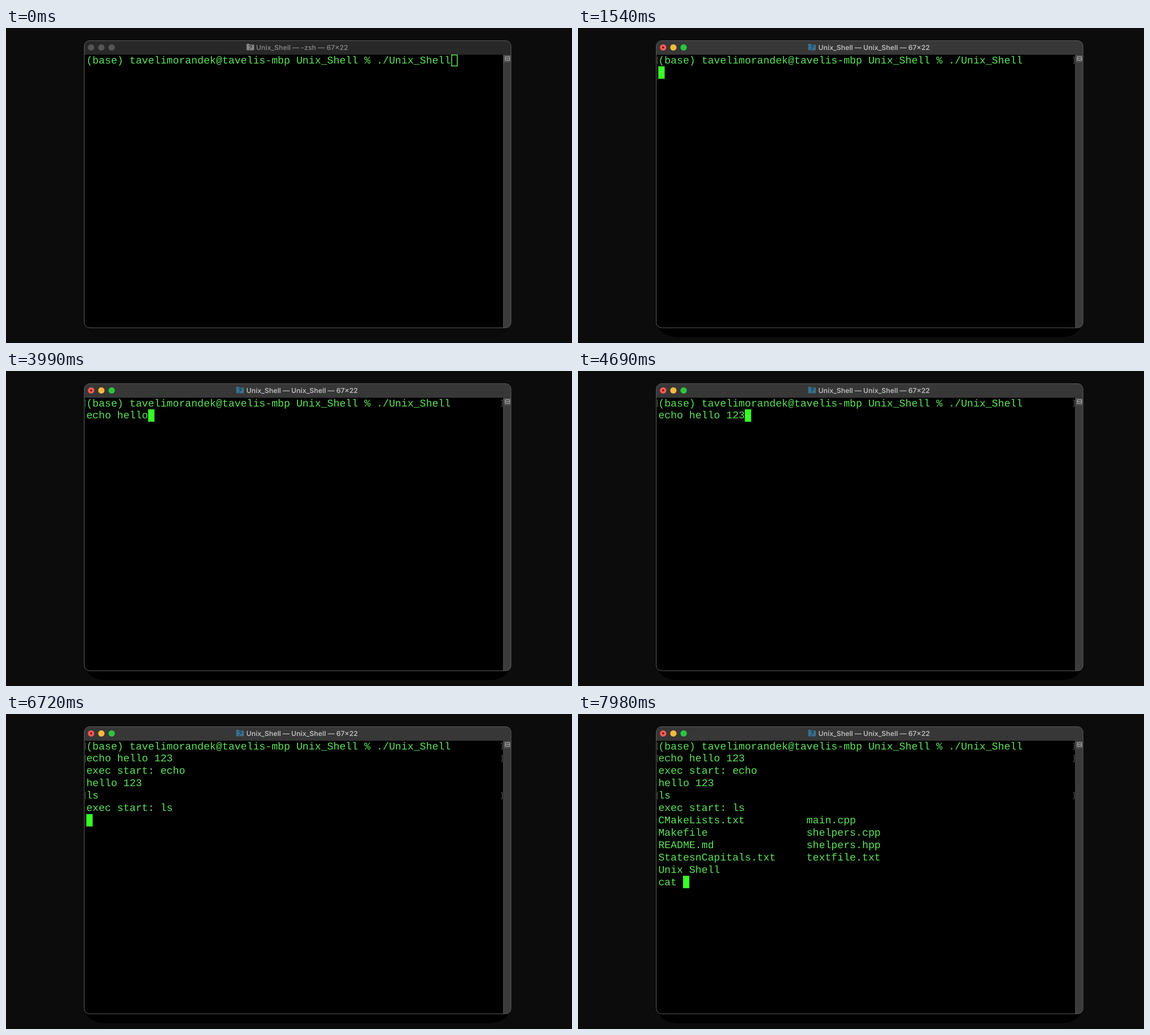
An HTML page for the animation above (8000 ms loop, 1002 by 559 pixels).

```html
<!DOCTYPE html>
<html lang="en">
<head>
<meta charset="utf-8">
<title>Terminal session</title>
<style>
  html, body { margin: 0; width: 100%; height: 100%; overflow: hidden; background: #0c0c0c; }
  svg { display: block; width: 100%; height: 100%; }
  text { white-space: pre; text-rendering: geometricPrecision; }
  .term { font: 18.23px "Liberation Mono", monospace; fill: #5ce35a; }
  .title { font: 600 12.2px Inter, sans-serif; text-anchor: middle; }
</style>
</head>
<body>
<svg viewBox="0 0 1002 559">
  <rect width="1002" height="559" fill="#0c0c0c"/>
  <path id="shadow" d="M143 525H889V533Q880 549 850 549H182Q152 549 143 533Z"/>
  <clipPath id="frame"><rect x="138.5" y="22.5" width="755.5" height="509.5" rx="9.5"/></clipPath>
  <g clip-path="url(#frame)">
    <rect x="138" y="22" width="757" height="511"/>
    <rect id="bar" x="138" y="22" width="757" height="25.5"/>
    <rect x="880.5" y="47.5" width="14" height="485" fill="#3b3b3b"/>
    <path d="M880.5 47.5V532" stroke="#4a4a4a" fill="none"/>
    <rect x="881" y="48" width="13" height="13" fill="#505050"/>
    <path d="M884 51h7.500v6.500h-7.500zM884 54.250h7.500" fill="none" stroke="#b0b0b0"/>
  </g>
  <rect x="138.500" y="22.500" width="755.500" height="509.500" rx="9.500" fill="none" stroke="#5b5b5b"/>
  <g id="lights">
    <circle cx="150.700" cy="34.500" r="5.600"/>
    <circle cx="168.800" cy="34.500" r="5.600"/>
    <circle cx="187" cy="34.500" r="5.600"/>
  </g>
  <circle id="dot" cx="150.700" cy="34.500" r="1.800" fill="#7a0b08"/>
  <g id="icon">
    <path id="folder" d="M0 1.500Q0 .5 1 .5H4.500L6 2H12.500Q13.500 2 13.500 3V11Q13.500 12 12.500 12H1Q0 12 0 11Z"/>
    <path id="glyph" d="M4.500 5Q5 3.500 7 3.500T9 5.500Q9 6.500 7 7.500V8.500M5 10.500L6 9.500" fill="none" stroke-width="1.200"/>
  </g>
  <text id="title" class="title" x="524.200" y="38.600"></text>
  <path id="marks" fill="none" stroke="#626262"/>
  <rect id="cursor"/>
  <g id="lines" class="term"></g>
</svg>
<script>
const LOOP = 8000, FOCUS = 700, LAUNCH = 1400;
const LEFT = 142.2, TOP = 46.1, COL = 10.94, ROW = 21.91;
const PROMPT = '(base) tavelimorandek@tavelis-mbp Unix_Shell % ./Unix_Shell';

const LISTING = [
  ['CMakeLists.txt', 'main.cpp'],
  ['Makefile', 'shelpers.cpp'],
  ['README.md', 'shelpers.hpp'],
  ['StatesnCapitals.txt', 'textfile.txt'],
  ['Unix Shell', '']
].map(([a, b]) => (b ? a.padEnd(24) + b : a) + '\n').join('');

// [time, appended output]
const OUTPUT = [
  [1260, '\n'],
  [2450, 'e'], [2730, 'c'], [2870, 'h'], [3080, 'o'], [3290, ' '],
  [3430, 'h'], [3570, 'e'], [3710, 'l'], [3850, 'l'], [3990, 'o'],
  [4130, ' '], [4340, '1'], [4550, '2'], [4690, '3'],
  [4830, '\nexec start: echo\n'],
  [4900, 'hello 123\n'],
  [6020, 'l'], [6230, 's'],
  [6720, '\nexec start: ls\n'],
  [6790, LISTING],
  [7560, 'c'], [7700, 'a'], [7840, 't'], [7980, ' ']
];

// [time, row] of each entered command
const ENTERED = [[1260, 0], [4830, 1], [6720, 4]];

const $ = id => document.getElementById(id);
const set = (el, attrs) => {
  for (const k in attrs) el.setAttribute(k, attrs[k]);
};

const rows = Array.from({ length: 22 }, (_, i) => {
  const el = document.createElementNS('http://www.w3.org/2000/svg', 'text');
  set(el, { x: LEFT, y: TOP + i * ROW + 16.4 });
  return $('lines').appendChild(el);
});

function drawChrome(t) {
  const active = t >= FOCUS, running = t >= LAUNCH;
  const colors = active ? ['#fc5b54', '#f6b83c', '#2ac640'] : ['#555', '#555', '#555'];
  [...$('lights').children].forEach((c, i) => set(c, { fill: colors[i] }));
  set($('dot'), { visibility: active ? 'visible' : 'hidden' });
  set($('shadow'), { fill: active ? '#000' : '#0a0a0a' });
  set($('bar'), { fill: active ? '#373737' : '#282828' });
  set($('folder'), { fill: active ? '#39718d' : '#858585' });
  set($('glyph'), { stroke: active ? '#172c39' : '#222' });
  set($('icon'), { transform: `translate(${running ? 407.5 : 425.8} 27.5)` });
  set($('title'), { fill: active ? '#b9b9b9' : '#7d7d7d' });
  $('title').textContent = `Unix_Shell — ${running ? 'Unix_Shell' : '-zsh'} — 67×22`;
}

function drawText(t) {
  const text = OUTPUT.reduce((s, [at, out]) => t >= at ? s + out : s, PROMPT);
  const lines = text.split('\n');
  rows.forEach((el, i) => {
    const line = lines[i] || '';
    if (el.textContent !== line) el.textContent = line;
  });

  const last = lines.length - 1;
  const x = LEFT + lines[last].length * COL, y = TOP + last * ROW;
  set($('cursor'), t < FOCUS
    ? { x: x + 1.3, y: y + 1.7, width: 9.8, height: 19.6, fill: 'none', stroke: '#62e95e', 'stroke-width': 1.5 }
    : { x, y, width: 11.2, height: 22, fill: '#38fe27', stroke: 'none' });

  set($('marks'), {
    d: ENTERED.filter(([at]) => t >= at).map(([, row]) => {
      const top = 51.5 + row * ROW;
      return `M142 ${top}h-1.5v11.500h1.5M876.500 ${top}h2v11.500h-2`;
    }).join('')
  });
}

function render(t) {
  drawChrome(t);
  drawText(t);
}

const start = performance.now();
function tick() {
  render((performance.now() - start) % LOOP);
  requestAnimationFrame(tick);
}
tick();
</script>
</body>
</html>
```
